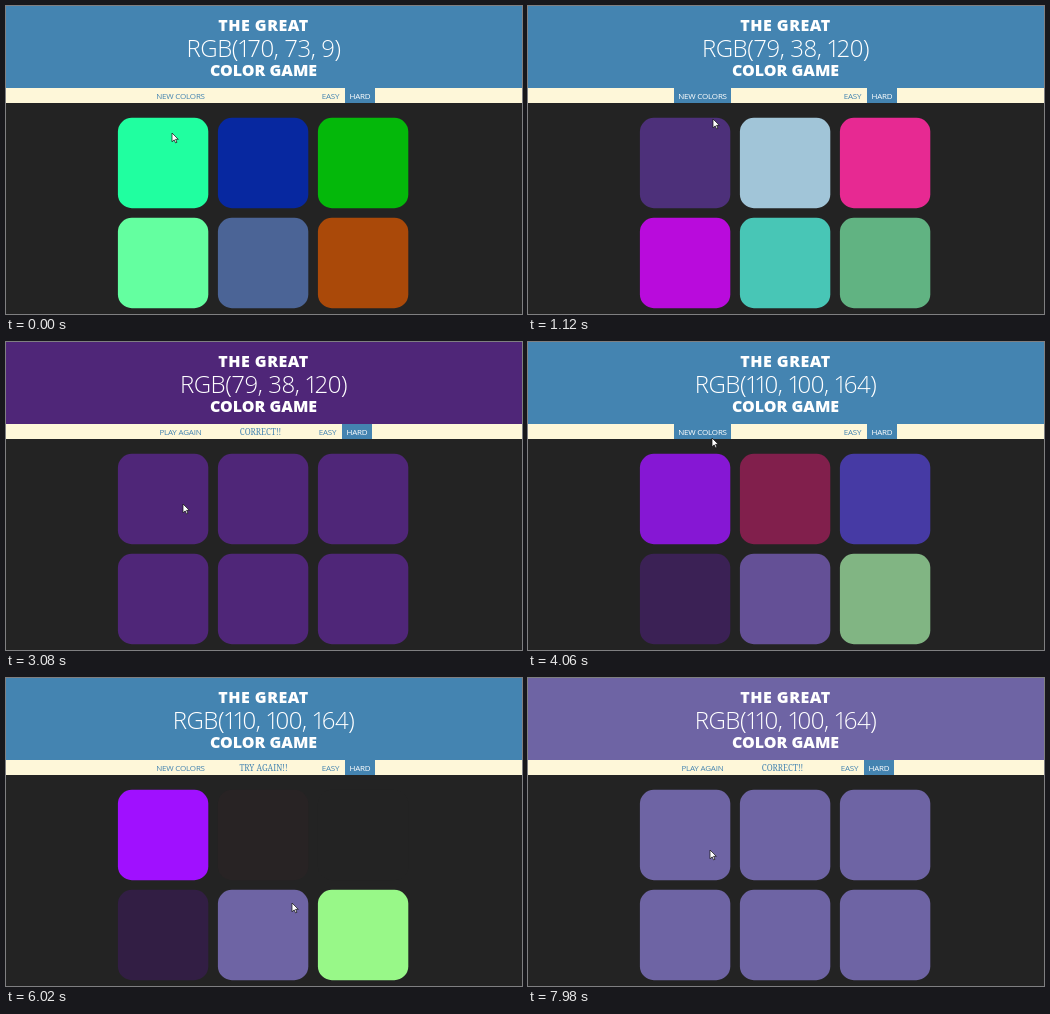
These frames come from a looping animation (516 by 308 pixels, 8000 ms). An HTML page:

```html
<!DOCTYPE html>
<html lang="en">
<head>
<meta charset="utf-8">
<title>Color Game</title>
<style>
  html, body { margin: 0; width: 100%; height: 100%; overflow: hidden; background: #232323; }
  #stage { position: relative; width: 516px; height: 308px; overflow: hidden; font-family: "Open Sans", "Noto Sans", sans-serif; }
  #stage > * { position: absolute; left: 0; width: 516px; }
  #head { top: 0; height: 82px; color: #fff; }
  #head div { position: absolute; left: 0; width: 515px; text-align: center; white-space: nowrap; }
  .title { font-size: 16px; font-weight: 800; line-height: 20px; }
  .title.top { top: 9px; letter-spacing: .5px; }
  .title.low { top: 54px; }
  #rgb { top: 26px; font-size: 24px; font-weight: 300; line-height: 32px; letter-spacing: -.45px; font-variant-numeric: tabular-nums; }
  #rgb i { font-style: normal; margin: 0 -3px 0 -1px; }
  #bar { top: 82px; height: 15px; background: #fef7d9; }
  #bar div { position: absolute; top: 0; height: 15px; font-size: 8px; line-height: 16px; letter-spacing: -.2px; text-align: center; white-space: nowrap; color: #4484b1; }
  #bar #msg { left: 218px; width: 79px; letter-spacing: 0; font-family: "Noto Serif", serif; }
  #easy { left: 309.5px; width: 30px; }
  #hard { left: 339px; width: 30px; }
  #bar .lit { color: #fff; background: #4484b1; }
  svg { top: 0; }
</style>
</head>
<body>
<div id="stage">
  <div id="head">
    <div class="title top">THE GREAT</div>
    <div id="rgb"></div>
    <div class="title low">COLOR GAME</div>
  </div>
  <div id="bar">
    <div id="reset"></div>
    <div id="msg"></div>
    <div id="easy">EASY</div>
    <div id="hard" class="lit">HARD</div>
  </div>
  <svg id="board" width="516" height="308">
    <path id="cursor" d="M0 0V16L4 12.5L6.5 18L9 17L6.5 11.5H11.5Z" fill="#fff" stroke="#111" stroke-width="1.3"/>
  </svg>
</div>
<script>
const $ = id => document.getElementById(id);
const LOOP = 8000, TICK = 70, FADE = 1000;
const hex = s => [0, 2, 4].map(i => parseInt(s.substr(i, 2), 16));
const css = c => `rgb(${c.map(Math.round).join(', ')})`;
const mix = (a, b, k) => a.map((v, i) => v + (b[i] - v) * k);
const BLUE = hex('4484b1'), BG = hex('232323');

const rounds = [
  { goal: 5, colors: '20ffa0 0728a0 04b80a 64ffa0 4b6496 aa4909' },
  { goal: 0, colors: '4f2678 a8ccdb f22298 bd00df 48cbb8 5eb888' },
  { goal: 4, colors: 'a010ff 981c38 4244b9 321e44 6e64a4 98f888' }
].map(r => ({ goal: r.goal, colors: r.colors.split(' ').map(hex) }));

// time and what is clicked: a square or the button for new colours
const clicks = [[385, 'new'], [1745, 0], [3660, 'new'], [4610, 2], [5270, 1], [6450, 4]];

// time, x, y of the cursor's stops
const stops = [
  [200, 166, 127], [400, 178, 90], [1000, 180, 91], [1120, 185, 113], [1700, 167, 161],
  [2730, 177, 162], [3480, 177, 161], [3640, 184, 91], [4060, 184, 96], [4600, 335, 155],
  [4970, 335, 156], [5320, 302, 158], [6020, 286, 225], [6450, 282, 239], [7840, 182, 172]
];

// cubic-bezier(.25, .1, .25, 1)
function ease(x) {
  if (x >= 1) return 1;
  const bez = (a, b, u) => 3 * a * u * (1 - u) ** 2 + 3 * b * u * u * (1 - u) + u ** 3;
  let lo = 0, hi = 1;
  for (let i = 0; i < 20; i++) {
    const u = (lo + hi) / 2;
    if (bez(.25, .25, u) < x) lo = u; else hi = u;
  }
  return bez(.1, 1, lo);
}

// plays every click up to time t
function gameAt(t) {
  let level = 0, won = false, msg = '', colors = rounds[0].colors;
  for (const [at, what] of clicks.filter(c => c[0] <= t)) {
    if (what === 'new') level++;
    const { goal, colors: fresh } = rounds[level];
    won = what === goal;
    msg = what === 'new' ? '' : won ? 'CORRECT!!' : 'TRY AGAIN!!';
    const k = ease((t - at) / FADE);
    colors = colors.map((c, i) => {
      if (what === 'new') return mix(c, fresh[i], k);
      if (won) return mix(c, fresh[goal], k);
      return i === what ? mix(c, BG, k) : c;
    });
  }
  const { goal, colors: full } = rounds[level];
  return { won, msg, colors, goal: full[goal] };
}

function cursorAt(t) {
  const n = stops.findIndex(s => s[0] > t);
  if (n < 1) return stops.at(n).slice(1);
  const [a, b] = [stops[n - 1], stops[n]];
  const k = (t - a[0]) / (b[0] - a[0]);
  return mix(a, b, k * k * (3 - 2 * k)).slice(1);
}

function hovered(t) {
  const [x, y] = cursorAt(t - 2 * TICK);
  return x > 146 && x < 203 && y > 82 && y < 97;
}

const squares = [0, 1, 2, 3, 4, 5].map(i => {
  const el = document.createElementNS('http://www.w3.org/2000/svg', 'rect');
  const box = { x: 111.9 + i % 3 * 100, y: 111.8 + Math.floor(i / 3) * 100, width: 90.4, height: 90.4, rx: 14 };
  for (const key in box) el.setAttribute(key, box[key]);
  $('board').insertBefore(el, $('cursor'));
  return el;
});

function render(t) {
  const { won, msg, colors, goal } = gameAt(t);
  $('head').style.background = css(won ? goal : BLUE);
  $('rgb').innerHTML = `RGB(${goal.join(', ')})`.replace(/1/g, '<i>1</i>');
  $('msg').textContent = msg;
  $('reset').textContent = won ? 'PLAY AGAIN' : 'NEW COLORS';
  $('reset').style.left = (won ? 149 : 146) + 'px';
  $('reset').style.width = (won ? 51 : 57) + 'px';
  $('reset').className = hovered(t) ? 'lit' : '';
  for (const id of ['msg', 'easy', 'hard']) $(id).style.transform = won ? 'translateX(-3px)' : 'none';
  squares.forEach((el, i) => el.setAttribute('fill', css(colors[i])));
  const [x, y] = cursorAt(t).map(Math.round);
  $('cursor').setAttribute('transform', `translate(${x} ${y}) scale(.55)`);
}

const start = performance.now();
function loop() {
  const t = (performance.now() - start) % LOOP;
  render(Math.floor(t / TICK) * TICK);
  requestAnimationFrame(loop);
}
loop();
</script>
</body>
</html>
```
